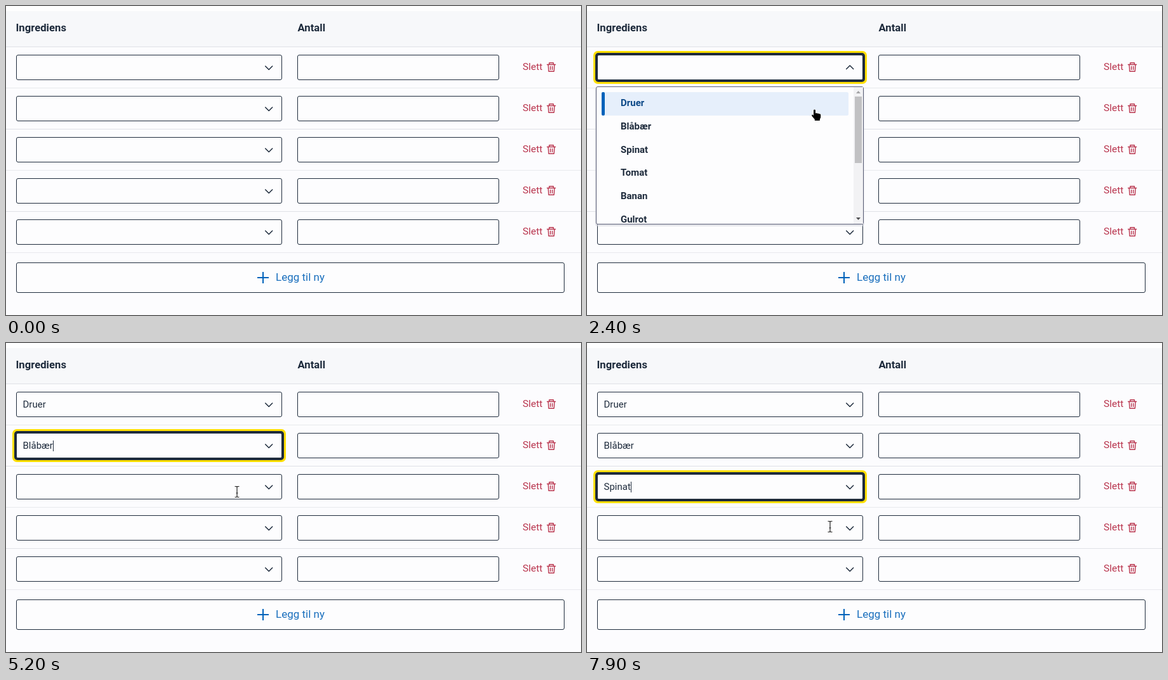
Animation, 906 px wide and 488 px high, one loop 8 s. Source, as an HTML page:

```html
<!DOCTYPE html>
<html lang="no">
<head>
<meta charset="utf-8">
<style>
  html, body { margin: 0; width: 100%; height: 100%; overflow: hidden; background: #fcfcfe; }
  svg { display: block; font: 15px Roboto, sans-serif; fill: #1e2b3c; }
  .head { font-size: 16.7px; font-weight: 700; }
  .box { fill: #fdfdfe; stroke: #1e2b3c; }
  .icon { fill: none; stroke: #1e2b3c; stroke-width: 1.5; stroke-linecap: round; stroke-linejoin: round; }
  .del { font-size: 15.5px; fill: #b9354e; }
  .trash { stroke: #b9354e; stroke-width: 1.4; }
  .add { font-size: 17px; fill: #1a6fbd; }
  .opt { font-weight: 700; }
  .active { fill: #0e4a88; }
</style>
</head>
<body>
<svg width="906" height="488" viewBox="0 0 906 488">
  <g id="page"></g>
  <g id="live"></g>
</svg>
<script>
const LOOP = 8000, STEP = 100, PITCH = 65, BLINK = 530;
const ITEMS = ['Druer', 'Blåbær', 'Spinat', 'Tomat', 'Banan', 'Gulrot', 'Mais', 'Eple'];
// When each row gains focus, opens its menu and gets its value
const PICKS = [
  { focus: 1800, open: 1900, done: 2900 },
  { focus: 3700, open: 3800, done: 4900 },
  { focus: 6200, open: 6300, done: 7400 }
];
// Pointer path: time, x, y
const PATH = [
  [600, 366, 500], [900, 362, 432], [1000, 360, 390], [1400, 352, 106], [1600, 351, 102],
  [1900, 351, 102], [2400, 361, 172], [2900, 361, 172], [3500, 380, 171], [3900, 380, 171],
  [4500, 361, 236], [4900, 361, 236], [5800, 374, 232], [6300, 374, 232], [6800, 361, 296],
  [7400, 361, 296], [7900, 383, 290]
];
const page = document.getElementById('page'), live = document.getElementById('live');

const rect = (x, y, w, h, attrs) => `<rect x="${x}" y="${y}" width="${w}" height="${h}" ${attrs}/>`;
const text = (x, y, s, cls = '') => `<text x="${x}" y="${y}" class="${cls}">${s}</text>`;
const path = (d, attrs = 'class="icon"') => `<path d="${d}" ${attrs}/>`;
const at = (x, y, s) => `<g transform="translate(${x} ${y})">${s}</g>`;

function drawPage() {
  let s = rect(0, 0, 906, 8, 'fill="#fefefe"') + rect(0, 8, 906, 56, 'fill="#f7f8fa"')
    + text(15.5, 40, 'Ingrediens', 'head') + text(459.5, 40, 'Antall', 'head');
  for (let i = 0; i < 6; i++)
    s += rect(0, 64 + i * PITCH, 906, 1, `fill="${i % 2 ? '#e8e9ed' : '#dfe1e6'}"`);
  for (let i = 0; i < 5; i++)
    s += at(0, i * PITCH,
      rect(16.5, 77.5, 418, 39, 'rx="2.5" class="box"') +
      rect(459.5, 77.5, 317, 39, 'rx="2.5" class="box"') +
      text(814, 101, 'Slett', 'del') +
      path('M852.7 92.5h13M856 92v-2.3h6.5V92M854.3 93l.8 10.3h8.3l.8-10.3M857.7 95.5v5M860.8 95.5v5',
        'class="icon trash"'));
  page.innerHTML = s + rect(16.5, 405.5, 863, 47, 'rx="2.5" class="box" id="button"')
    + path('M396 429h18M405 420v18', 'stroke="#0062ba" stroke-width="2"')
    + text(425, 434, 'Legg til ny', 'add');
}

function pointerAt(t) {
  const k = PATH.findIndex(p => p[0] > t);
  if (k === 0) return null;
  if (k < 0) return PATH[PATH.length - 1].slice(1);
  const [t0, x0, y0] = PATH[k - 1], [t1, x1, y1] = PATH[k];
  const u = (t - t0) / (t1 - t0), e = u * u * (3 - 2 * u);
  return [x0 + (x1 - x0) * e, y0 + (y1 - y0) * e];
}

function drawPointer(x, y, kind) {
  const outline = 'fill="#000" stroke="#fff" stroke-width="1.2" stroke-linejoin="round" paint-order="stroke"';
  const beam = 'M-3.5-8.5h2.5l1 1 1-1h2.5M0-7.5v15M-3.5 8.5h2.5l1-1 1 1h2.5M-1.5 2h3';
  const shapes = {
    beam: path(beam, 'fill="none" stroke="#fff" stroke-width="3"')
      + path(beam, 'fill="none" stroke="#222" stroke-width="1.2"'),
    hand: path('M-4-7.5q1.5-2 3 0v5q1.5-1 2.8.2 1.6-.7 2.6.6 2-.4 2.8 1.2V4L5.8 7v2h-8V7L-6.5 2q-1-2.4 1-2.4L-4 1Z', outline),
    arrow: path('M-4-8V7l3.5-3.3L2 9l2.5-1.2L2 3h5Z', outline)
  };
  return at(Math.round(x), Math.round(y), shapes[kind]);
}

function drawMenu(row, pointer) {
  const first = 136 + row * PITCH;
  const over = pointer[1] >= first && pointer[1] < first + 37;
  let s = rect(13, 129, 424, 219, 'rx="4" fill="#d4d5de" opacity=".6"')
    + rect(14.5, 127.5, 421, 217, 'rx="2.5" class="box" style="stroke: #5c6078"');
  if (over) s += rect(23, 136, 389, 37, 'rx="2.5" fill="#e6effb"') + rect(23, 136, 5, 37, 'rx="2" fill="#0062ba"');
  ITEMS.slice(row, row + 6).forEach((name, i) => {
    s += text(53, Math.round(158 + i * 36.75), name, over && !i ? 'opt active' : 'opt');
  });
  s += rect(420, 128, 15, 216, 'fill="#f2f2f4"')
    + rect(422, 143, 11, 105 + row * 11.5, 'fill="#c1c1c3"')
    + path('M424 138h7l-3.5-4Z', 'fill="#a3a3a5"')
    + path('M424 334h7l-3.5 4Z', 'fill="#505052"');
  return at(0, row * PITCH, s);
}

function draw(t) {
  const pointer = pointerAt(t);
  const focused = PICKS.filter(p => t >= p.focus).length - 1;
  const pick = PICKS[focused];
  const open = pick && t >= pick.open && t < pick.done;
  let s = '';

  if (pick)
    s += at(0, focused * PITCH,
      rect(10, 71, 431, 52, 'rx="7" fill="#ffdf00"') +
      rect(13, 74, 425, 46, 'rx="5" fill="#1e2b3c"') +
      rect(17, 78, 417, 38, 'rx="1.5" fill="#fdfdfe"'));

  for (let i = 0; i < 5; i++) {
    const value = PICKS[i] && t >= PICKS[i].done ? ITEMS[i] : '';
    s += at(0, i * PITCH,
      path(open && i === focused ? 'M408.7 99.5l5.5-5.5 5.5 5.5' : 'M408.7 95l5.5 5.5 5.5-5.5') +
      text(26.5, 102, value, 'value'));
  }
  if (open) s += drawMenu(focused, pointer);

  let hover = false;
  if (pointer) {
    const [x, y] = pointer, menuTop = 127 + focused * PITCH;
    const onMenu = open && y > menuTop && y < menuTop + 217;
    const onField = y > 77 && y < 377 && (y - 77) % PITCH < 40;
    hover = y > 405 && y < 453;
    s += drawPointer(x, y, onMenu || hover ? 'hand' : onField ? 'beam' : 'arrow');
  }
  live.innerHTML = s;
  document.getElementById('button').style.fill = hover ? '#f1f6fc' : '';

  // The caret restarts its blink on focus and on selection
  if (pick && (t - (t >= pick.done ? pick.done : pick.focus)) % (2 * BLINK) < BLINK) {
    const width = live.querySelectorAll('.value')[focused].getComputedTextLength();
    const caret = rect(Math.round(27 + width), 89 + focused * PITCH, 1, 17, 'fill="#1e2b3c"');
    live.insertAdjacentHTML('beforeend', caret);
  }
}

function tick() {
  const t = performance.now() % LOOP;
  draw(Math.floor(t / STEP) * STEP);
  requestAnimationFrame(tick);
}

drawPage();
tick();
</script>
</body>
</html>
```
